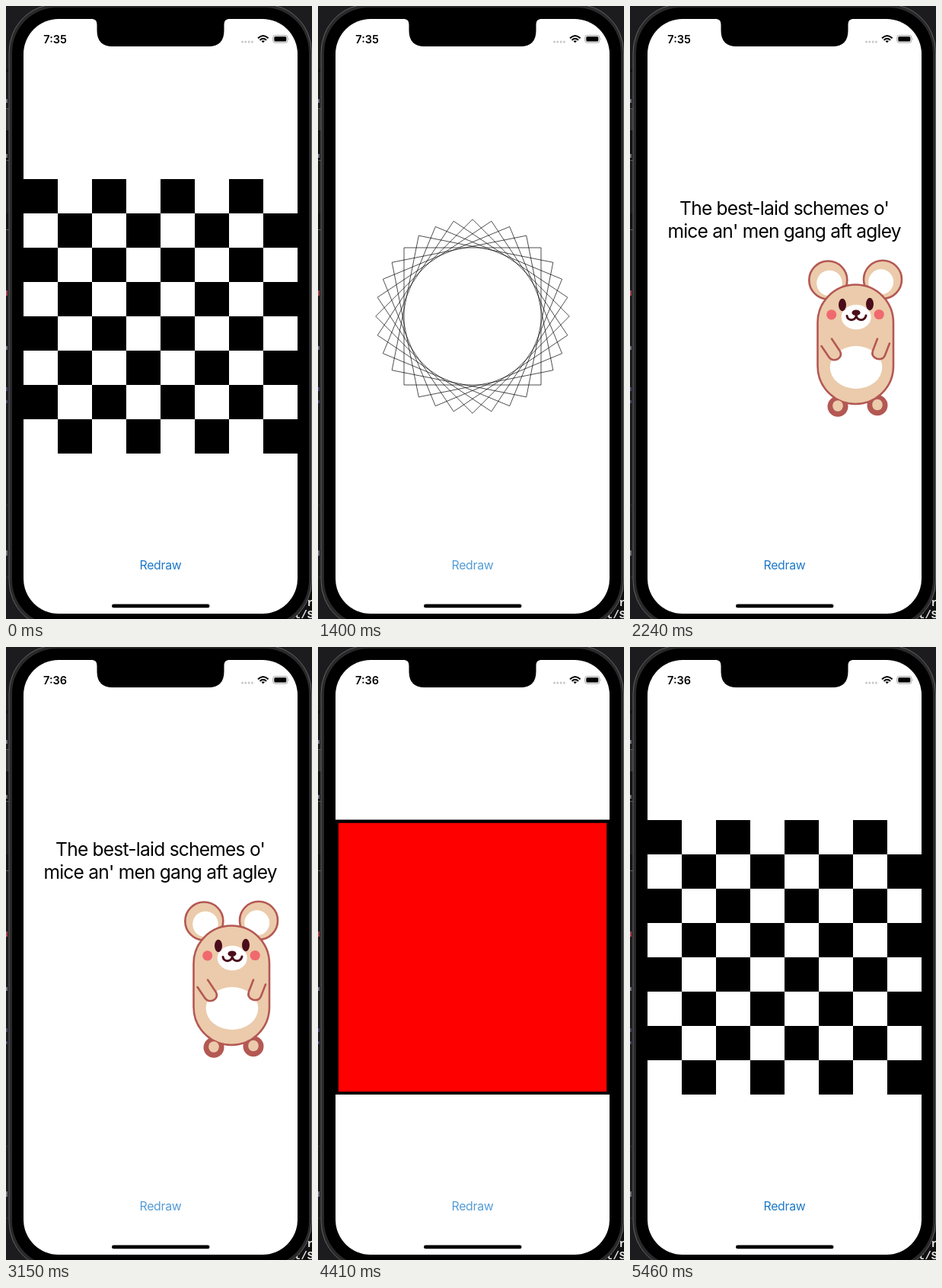
Recreate the animation shown at these times as an HTML page. Size 402 by 804 pixels, loop 5.95 s.

```html
<!DOCTYPE html>
<html lang="en">
<head>
<meta charset="utf-8">
<title>Redraw</title>
<style>
  html, body { margin: 0; width: 100%; height: 100%; overflow: hidden; background: #1c1c1f; }
  svg { display: block; width: 100%; height: 100%; }
  text { font-family: Inter, "Open Sans", sans-serif; font-optical-sizing: none; text-anchor: middle; }
  .clock { font-size: 14.5px; font-weight: 600; }
  .button { font-size: 15.8px; letter-spacing: -.25px; fill: #1d79c7; }
  .poem { font-size: 24.5px; letter-spacing: -.75px; }
  .term { font: bold 14px "Liberation Mono", monospace; fill: #e8e8e8; text-anchor: start; }
  .thin { fill: none; stroke: #000; stroke-width: .703; stroke-miterlimit: 10; }
  .fur { fill: #ebcbab; stroke: #b45853; stroke-width: 2.6; stroke-linecap: round; stroke-linejoin: round; }
  .dark { fill: #4b0d1b; }

  .show { visibility: hidden; animation: 5.95s step-end infinite; }
  #checks { animation-name: checks; }
  #squares { animation-name: squares; }
  #lines { animation-name: lines; }
  #mouse { animation-name: mouse; }
  #rect { animation-name: rect; }
  #disc { animation-name: disc; }
  #early { animation-name: early; }
  #late { animation-name: late; }
  .button { animation: press 5.95s step-end infinite; }

  @keyframes checks { 0%, 91.764% { visibility: visible } 12.941% { visibility: hidden } 100% { visibility: visible } }
  @keyframes squares { 0%, 25.882%, 100% { visibility: hidden } 12.941% { visibility: visible } }
  @keyframes lines { 0%, 37.647%, 100% { visibility: hidden } 25.882% { visibility: visible } }
  @keyframes mouse { 0%, 56.47%, 100% { visibility: hidden } 37.647% { visibility: visible } }
  @keyframes rect { 0%, 76.47%, 100% { visibility: hidden } 56.47% { visibility: visible } }
  @keyframes disc { 0%, 91.764%, 100% { visibility: hidden } 76.47% { visibility: visible } }
  @keyframes early { 0%, 100% { visibility: visible } 47.058% { visibility: hidden } }
  @keyframes late { 0%, 100% { visibility: hidden } 47.058% { visibility: visible } }
  @keyframes press {
    0%, 12.941%, 25.882%, 37.647%, 56.47%, 76.47%, 91.764%, 100% { fill: #1d79c7 }
    11.764%, 23.529%, 35.294%, 52.941%, 74.117%, 88.235% { fill: #559cd6 }
  }
</style>
</head>
<body>
<svg viewBox="0 0 402 804">
  <defs>
    <pattern id="cells" x="23" y="227" width="90" height="90" patternUnits="userSpaceOnUse">
      <path d="M0 0h45v45h-45zM45 45h45v45h-45z" shape-rendering="crispEdges"/>
    </pattern>
    <clipPath id="board"><rect x="23" y="226.6" width="360" height="360.4"/></clipPath>
  </defs>

  <!-- desktop behind the phone -->
  <rect width="402" height="804" fill="#1c1c1f"/>
  <path d="M0 135h4v28h-4z" fill="#303033"/>
  <path d="M0 83h4v4h-4zM0 163h4v39h-4zM0 272h4v20h-4z" fill="#121214"/>
  <path d="M0 134.5h4M0 202.5h4M0 293.5h4" stroke="#57575a"/>
  <path d="M0 655h3M0 749h16" stroke="#333336"/>
  <path d="M1 122v5M1 194v5M1 446v5M1 714v7" stroke="#8b8b99" stroke-width="1.6"/>
  <path d="M1 373v7" stroke="#a8444c" stroke-width="2"/>
  <path d="M1 500v5M1 517v4" stroke="#5d4c80" stroke-width="1.6"/>
  <path d="M330 768h72v36h-72z" fill="#101011"/>
  <text class="term" x="395.5" y="787">r</text>
  <text class="term" x="379" y="803">t/S</text>

  <!-- phone -->
  <rect x="4" y="-2.5" width="397.5" height="819" rx="63" fill="#29292a" stroke="#626264"/>
  <rect x="8" y="2" width="390" height="810" rx="59"/>
  <rect x="23" y="17" width="360" height="780" rx="46" fill="#fff"/>
  <path d="M112 16H294V17C289 17 286.5 19 286.5 25V32Q286.5 53 266 53H140Q119.500 53 119.500 32V25C119.500 19 117 17 112 17z"/>
  <rect x="139" y="784.5" width="128.500" height="4.800" rx="2.400"/>

  <text class="clock show" id="early" x="64.600" y="48.700">7:35</text>
  <text class="clock show" id="late" x="64.600" y="48.700">7:36</text>

  <path d="M310.500 47h.01M314.800 47h.01M319.100 47h.01M323.400 47h.01" stroke="#c8c8c8" stroke-width="3" stroke-linecap="round"/>
  <g fill="none" stroke="#000" stroke-width="2">
    <path d="M331 42.200Q337.800 35.800 344.600 42.200M333.500 44.800Q337.800 40.800 342.100 44.800"/>
    <path d="M337.800 48.200l-2.200-2.200q2.200-1.700 4.400 0z" fill="#000" stroke="none"/>
  </g>
  <rect x="350.800" y="38.500" width="19" height="9.600" rx="2.700" fill="none" stroke="#a0a0a0"/>
  <rect x="352.300" y="40" width="16" height="6.600" rx="1.500"/>
  <path d="M371 41.700q1.500 1.600 0 3.200z" fill="#a0a0a0"/>

  <!-- drawings -->
  <rect class="show" id="checks" x="23" y="227" width="360" height="360" fill="url(#cells)"/>
  <path class="show thin" id="squares"/>
  <path class="show thin" id="lines"/>

  <g class="show" id="mouse">
    <text class="poem" x="202.600" y="273.500">The best-laid schemes o'</text>
    <text class="poem" x="202.600" y="304">mice an' men gang aft agley</text>
    <g class="fur">
      <circle cx="260.300" cy="359.500" r="25"/>
      <circle cx="332" cy="358.800" r="25"/>
    </g>
    <circle cx="262" cy="363.500" r="16.800" fill="#fff"/>
    <circle cx="329.700" cy="361.800" r="16.500" fill="#fff"/>
    <g fill="#b45853"><circle cx="273" cy="525.300" r="13.500"/><circle cx="325" cy="523.800" r="13.500"/></g>
    <rect class="fur" x="246.500" y="365.500" width="99.500" height="156.500" rx="49.700"/>
    <g fill="#ebcbab"><ellipse cx="273" cy="524.500" rx="6.800" ry="7.300"/><ellipse cx="325" cy="523" rx="6.800" ry="7.300"/></g>
    <ellipse cx="297" cy="474" rx="34.300" ry="28" fill="#fff"/>
    <path class="fur" d="M251.500 446L261 460Q265 466 272 463.500Q279 460 276 453L265 436.500"/>
    <path class="fur" d="M341 442.500L335 458Q332 465 324 462.500Q316.500 459.500 319 452L325 436.500"/>
    <ellipse cx="297.200" cy="408" rx="19.500" ry="16.300" fill="#fff"/>
    <g fill="#f0696e"><circle cx="264.700" cy="404.800" r="6.600"/><circle cx="327.200" cy="404.500" r="6.600"/></g>
    <g class="dark">
      <ellipse cx="279" cy="392" rx="5" ry="8.200"/>
      <ellipse cx="315" cy="391" rx="5" ry="8.200"/>
      <ellipse cx="297" cy="402.300" rx="5.500" ry="3.800"/>
    </g>
    <path d="M285 406.500C286 413.500 296.500 413.500 297.200 406C298 413.500 308.500 413.500 310 406" fill="none" stroke="#4b0d1b" stroke-width="3" stroke-linecap="round"/>
  </g>

  <g clip-path="url(#board)" stroke="#000" stroke-width="7.600">
    <rect class="show" id="rect" x="23" y="227" width="360" height="360" fill="#f00"/>
    <circle class="show" id="disc" cx="203" cy="407" r="180" fill="#f00"/>
  </g>

  <text class="button" x="203" y="739.300">Redraw</text>
</svg>
<script>
  const CX = 203, CY = 407, SCALE = 360 / 512;

  function spin(x, y, angle) {
    const c = Math.cos(angle), s = Math.sin(angle);
    return (CX + SCALE * (x * c - y * s)).toFixed(2) + " " + (CY + SCALE * (x * s + y * c)).toFixed(2);
  }

  function squares() {
    const corners = [[-128, -128], [128, -128], [128, 128], [-128, 128]];
    let d = "";
    for (let i = 0; i < 8; i++) {
      d += "M" + corners.map(([x, y]) => spin(x, y, i * Math.PI / 16)).join("L") + "Z";
    }
    return d;
  }

  function lines() {
    const points = [];
    for (let i = 0; i < 256; i++) {
      points.push(spin(256 * 0.99 ** i, 50, (i + 1) * Math.PI / 2));
    }
    return "M" + points.join("L");
  }

  document.getElementById("squares").setAttribute("d", squares());
  document.getElementById("lines").setAttribute("d", lines());
</script>
</body>
</html>
```
